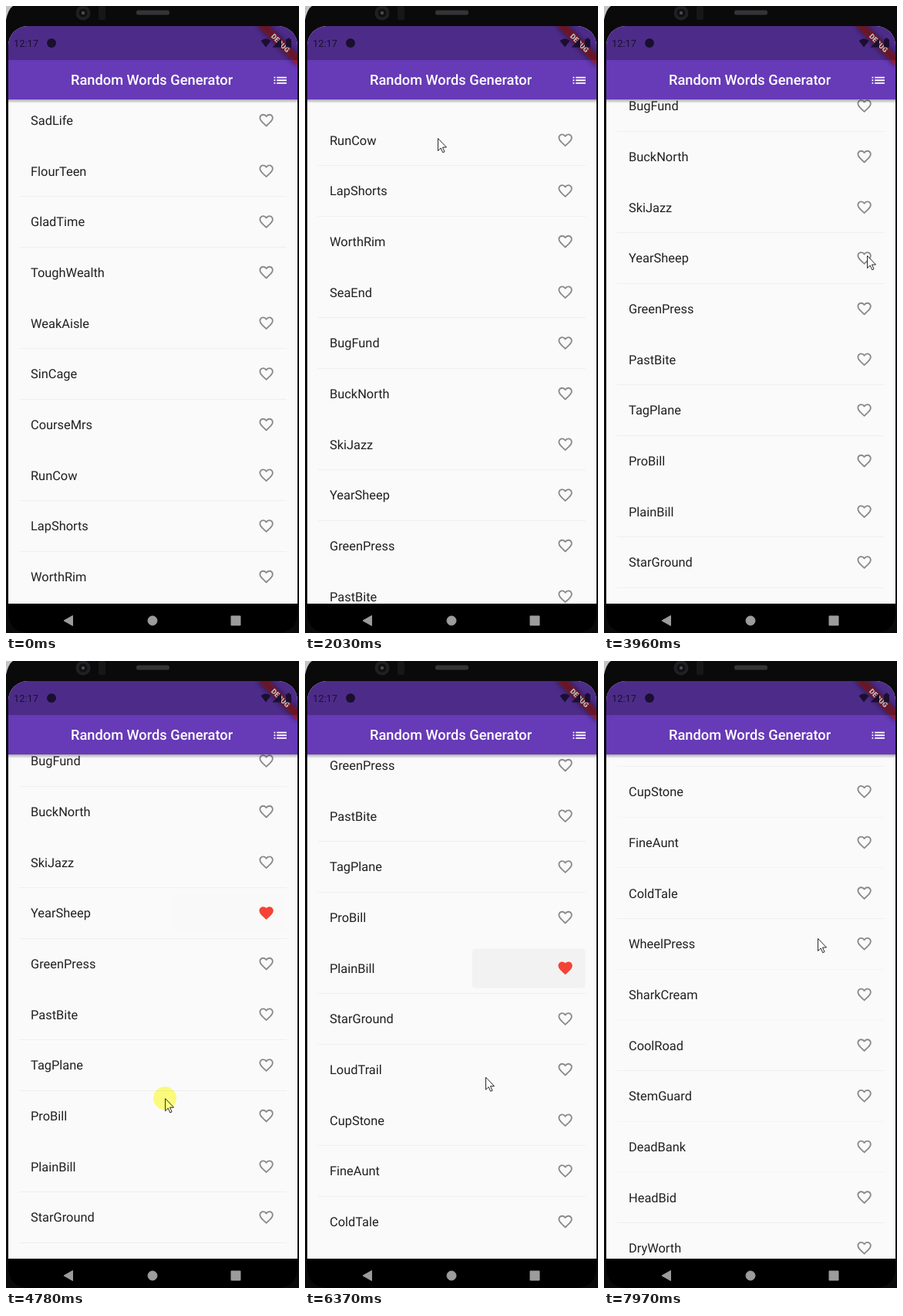
These frames come from a looping animation (380 by 812 pixels, 8000 ms). An HTML page:

```html
<!DOCTYPE html>
<html lang="en">
<head>
<meta charset="utf-8">
<title>Random Words Generator</title>
<style>
  html, body { margin: 0; width: 100%; height: 100%; overflow: hidden; background: #0a0a0b; }
  svg { display: block; width: 380px; height: 812px; }
  text { font-family: Roboto, sans-serif; text-rendering: geometricPrecision; }
  .word { font-size: 16.4px; fill: #212121; }
  #press { mix-blend-mode: multiply; }
</style>
</head>
<body>
<svg viewBox="0 0 380 812">
  <defs>
    <clipPath id="screen"><path d="M3 774V51A25 25 0 0 1 28 26H353A25 25 0 0 1 378 51V774Z"/></clipPath>
    <clipPath id="view"><rect x="3" y="121" width="375" height="653"/></clipPath>
    <filter id="blur" x="-50%" y="-200%" width="200%" height="500%"><feGaussianBlur stdDeviation="3.6"/></filter>
    <linearGradient id="shade" x2="0" y2="1">
      <stop stop-color="#000" stop-opacity=".32"/>
      <stop offset="1" stop-color="#000" stop-opacity="0"/>
    </linearGradient>
    <path id="open" d="M16.5 3c-1.74 0-3.41.81-4.5 2.09C10.91 3.81 9.24 3 7.5 3 4.42 3 2 5.42 2 8.5c0 3.78 3.4 6.86 8.55 11.54L12 21.35l1.45-1.32C18.6 15.36 22 12.28 22 8.5 22 5.42 19.58 3 16.5 3zm-4.4 15.55l-.1.1-.1-.1C7.14 14.24 4 11.39 4 8.5 4 6.5 5.5 5 7.5 5c1.54 0 3.04.99 3.57 2.36h1.87C13.46 5.99 14.96 5 16.5 5c2 0 3.5 1.5 3.5 3.5 0 2.89-3.14 5.74-7.9 10.05z"/>
    <path id="full" d="M12 21.35l-1.45-1.32C5.4 15.36 2 12.28 2 8.5 2 5.42 4.42 3 7.5 3c1.74 0 3.41.81 4.5 2.09C13.09 3.81 14.76 3 16.5 3 19.58 3 22 5.42 22 8.5c0 3.78-3.4 6.86-8.55 11.54z"/>
  </defs>

  <!-- phone body -->
  <rect width="380" height="812" fill="#0a0a0b"/>
  <path d="M0 0H9Q3 4 0 18Z" fill="#c4c4c6"/>
  <circle cx="100" cy="9" r="9.5" fill="#202022"/>
  <circle cx="100" cy="9" r="5.5" fill="#101012"/>
  <circle cx="100" cy="9" r="2.2" fill="#4a4a4e"/>
  <rect x="120" y="0" width="9" height="18" rx="2" fill="#171718"/>
  <rect x="169" y="5.5" width="43" height="6" rx="2.5" fill="#343436"/>
  <path d="M3 774H378V784Q378 812 350 812H31Q3 812 3 784Z"/>

  <g clip-path="url(#screen)">
    <rect x="3" y="26" width="375" height="748" fill="#fafafa"/>
    <g id="list" clip-path="url(#view)"></g>
    <rect x="3" y="121" width="375" height="5" fill="url(#shade)"/>
    <rect x="3" y="26" width="375" height="95" fill="#673ab7"/>
    <text x="84" y="102" font-size="18.25" font-weight="500" fill="#fff">Random Words Generator</text>
    <path transform="translate(344.75 85.3) scale(.913)" fill="#fff" d="M3 7h2v2H3zM3 11h2v2H3zM3 15h2v2H3zM7 7h14v2H7zM7 11h14v2H7zM7 15h14v2H7z"/>
    <g transform="translate(378 26) rotate(45)">
      <rect x="-36.5" y="25.6" width="73" height="10.9" opacity=".5" filter="url(#blur)"/>
      <rect x="-36.5" y="25.6" width="73" height="10.9" fill="#b71c1c" fill-opacity=".63"/>
      <text y="34.4" font-size="9.3" font-weight="900" text-anchor="middle" fill="#fff">DEBUG</text>
    </g>
    <!-- status bar -->
    <rect x="3" y="26" width="375" height="44" opacity=".25"/>
    <g fill="#1b0f30">
      <text x="10" y="53" font-size="12.8">12:17</text>
      <circle cx="59" cy="48" r="6"/>
      <path d="M330.5 45Q337 39.5 343.5 45L337 53.5Z"/>
      <path d="M357 42V53.5H345.5Z"/>
      <path d="M363 43h2v-1.5h3V43h2v10.5h-7z"/>
    </g>
  </g>

  <g fill="#9c9c9c" stroke="#9c9c9c" stroke-linejoin="round">
    <path d="M75 796L86.5 789.5V802.5Z"/>
    <circle cx="190" cy="796" r="6"/>
    <rect x="292" y="790" width="12" height="12"/>
  </g>

  <path id="arrow" d="M.5 .5V16.5L4.2 13 6.7 18.7 9 17.7 6.5 12H11.5Z" fill="#fff" stroke="#111" stroke-width=".9"/>
  <circle id="press" r="15" fill="#ffff80"/>
</svg>
<script>
const LOOP = 8000, STEP = 70, ENTER = 980;
const PITCH = 65.667, TOP = 148.3;
const SLOP = 170;      // the list follows a drag this much later
const TRAVEL = 500;    // longest trip between two gestures
const words = ("SadLife FlourTeen GladTime ToughWealth WeakAisle SinCage CourseMrs RunCow " +
  "LapShorts WorthRim SeaEnd BugFund BuckNorth SkiJazz YearSheep GreenPress PastBite TagPlane " +
  "ProBill PlainBill StarGround LoudTrail CupStone FineAunt ColdTale WheelPress SharkCream " +
  "CoolRoad StemGuard DeadBank HeadBid DryWorth").split(" ");

const drag = (down, up, leave, from, to) => ({ down, up, leave, from, to });
const tap = (down, leave, from, word) => ({ down, up: down, leave, from, to: from, word });

const gestures = [
  tap(ENTER, ENTER, [355, 470]),
  drag(1400, 1990, 2030, [212, 605], [172, 171]),
  drag(2380, 2870, 3270, [194, 636], [186, 329]),
  tap(3960, 4170, [341, 323], "YearSheep"),
  drag(4590, 5200, 5400, [205, 615], [211, 358]),
  tap(5760, 6160, [337, 396], "PlainBill"),
  drag(6510, 7000, 7070, [178, 616], [217, 317]),
  drag(7350, 7760, 7760, [230, 548], [236, 421.5]),
  tap(7910, 7910, [277, 359])
];

const $ = id => document.getElementById(id);
const list = $("list"), arrow = $("arrow"), press = $("press");

const clamp = v => Math.max(0, Math.min(1, v));
function ease(t, a, b) {
  const p = b > a ? clamp((t - a) / (b - a)) : +(t >= a);
  return p * p * (3 - 2 * p);
}
const mix = (a, b, p) => a.map((v, i) => v + (b[i] - v) * p);

function add(parent, tag, attrs) {
  const el = document.createElementNS("http://www.w3.org/2000/svg", tag);
  for (const k in attrs) el.setAttribute(k, attrs[k]);
  return parent.appendChild(el);
}

const rows = words.map((word, i) => {
  const g = add(list, "g", {});
  const glow = add(g, "rect", { x: 217, y: -25.5, width: 146.5, height: 51, rx: 4 });
  add(g, "text", { x: 32, y: 5.8, class: "word" }).textContent = word;
  const heart = add(g, "use", { transform: "translate(326.65 -11.2) scale(.913)" });
  const line = add(list, "rect", { x: 17, width: 347, height: 1 });
  const like = gestures.find(s => s.word === word);
  return { i, g, glow, heart, line, liked: like ? like.down + 130 : Infinity };
});

function pointerAt(t) {
  const n = gestures.findLastIndex(s => t >= s.down);
  const s = gestures[Math.max(0, n)], next = gestures[n + 1];
  if (t < s.leave || !next) return mix(s.from, s.to, ease(t, s.down, s.up));
  return mix(s.to, next.from, ease(t, s.leave, Math.min(next.down, s.leave + TRAVEL)));
}

const offsetAt = t => gestures.reduce(
  (sum, s) => sum + (s.from[1] - s.to[1]) * ease(t, s.down + SLOP, s.up), 0);

function drawRow({ i, g, glow, heart, line, liked }, t, offset) {
  const y = TOP + PITCH * i - offset, on = t >= liked;
  g.setAttribute("transform", `translate(0 ${y.toFixed(2)})`);
  heart.setAttribute("href", on ? "#full" : "#open");
  heart.setAttribute("fill", on ? "#f44336" : "#8a8a8a");
  glow.setAttribute("opacity", on ? 0.03 * clamp((680 - t + liked) / 150) : 0);

  // hairlines fade when they fall between two pixel rows
  const edge = y + PITCH / 2 - 0.15, row = Math.floor(edge), f = edge - row;
  line.setAttribute("y", row);
  line.setAttribute("opacity", Math.min(0.045, Math.min(f, 1 - f) * 0.14));
}

function draw(time) {
  const t = Math.floor(time / STEP) * STEP;
  const offset = offsetAt(t);
  rows.forEach(r => drawRow(r, t, offset));

  const place = `translate(${pointerAt(t).map(v => v.toFixed(1)).join(" ")})`;
  const held = gestures.some(s => t >= s.down && t < s.leave);
  arrow.setAttribute("transform", place);
  press.setAttribute("transform", place);
  arrow.setAttribute("visibility", t < ENTER ? "hidden" : "visible");
  press.setAttribute("visibility", held ? "visible" : "hidden");
}

const begin = performance.now();
function tick() {
  draw((performance.now() - begin) % LOOP);
  requestAnimationFrame(tick);
}
tick();
</script>
</body>
</html>
```
